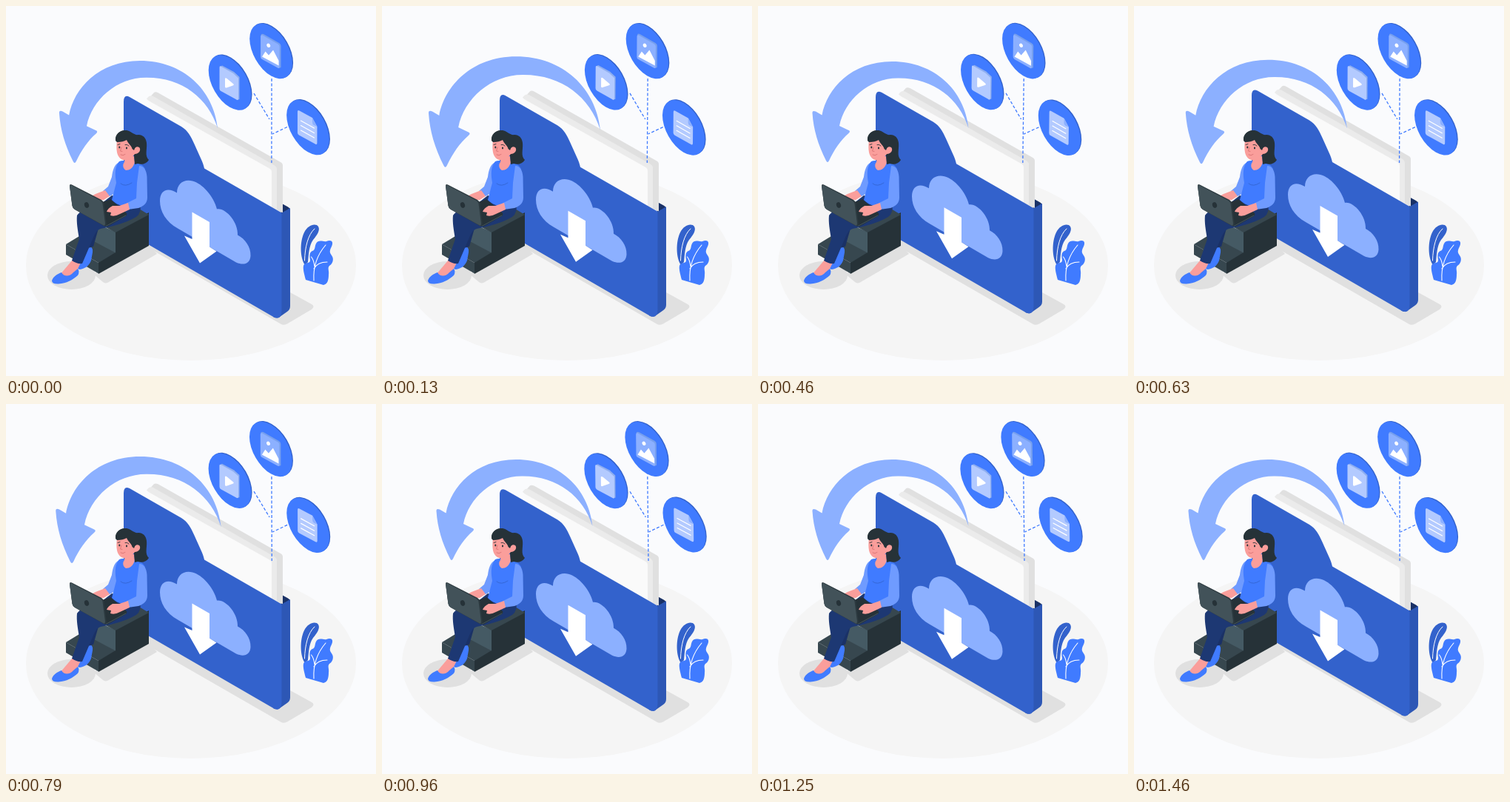
These frames come from a looping animation (500x500 px, 1500 ms). An HTML page with a canvas:

```html
<!DOCTYPE html>
<html lang="en">
<head>
<meta charset="utf-8">
<title>Cloud download</title>
<style>
  html, body { margin: 0; width: 100%; height: 100%; overflow: hidden; background: #fafbfd; }
  canvas { display: block; width: 500px; height: 500px; }
</style>
</head>
<body>
<canvas id="stage"></canvas>
<script>
const LOOP = 1500;
const PHASE = 21;
const BLUE = '#407bff', DEEP = '#3362cc', SIDE = '#2d57b5', NAVY = '#1a3166', DENIM = '#1d3873';
const PALE = '#8cb0ff', PAGE = '#b3caff', SLEEVE = '#6f9bff', SKIN = '#fa9e9b';
const INK = '#263238', SLATE = '#37474f', STEEL = '#425259';
const WHITE = '#fff', SHADE = '#e0e0e0';

const canvas = document.getElementById('stage');
const ctx = canvas.getContext('2d');
const ratio = window.devicePixelRatio || 1;
canvas.width = canvas.height = 500 * ratio;

const cache = new Map();
function path(d) {
  if (!cache.has(d)) cache.set(d, new Path2D(d));
  return cache.get(d);
}

function fill(color, d) {
  ctx.fillStyle = color;
  ctx.fill(path(d));
}

function line(color, width, d, dash = []) {
  ctx.strokeStyle = color;
  ctx.lineWidth = width;
  ctx.lineCap = dash.length ? 'butt' : 'round';
  ctx.lineJoin = 'round';
  ctx.setLineDash(dash);
  ctx.stroke(path(d));
}

function oval(color, x, y, rx, ry, turn = 0) {
  ctx.fillStyle = color;
  ctx.beginPath();
  ctx.ellipse(x, y, rx, ry, turn, 0, Math.PI * 2);
  ctx.fill();
}

function group(setup, draw) {
  ctx.save();
  setup();
  draw();
  ctx.restore();
}

// Linear interpolation through [position, value] stops.
function track(p, stops) {
  const i = stops.findIndex(s => s[0] > p);
  const [p0, v0] = stops[i - 1], [p1, v1] = stops[i];
  return v0 + (v1 - v0) * (p - p0) / (p1 - p0);
}

const floatY = p => track(p, [[0, 0], [.5, -10], [1, 0]]);
const sway = p => track(p, [[0, 0], [.25, 1], [.75, -1], [1, 0]]) * Math.PI / 180;
const beat = p => track(p, [[0, 1], [.1, 1.1], [.3, 1], [.4, 1], [.5, 1.1], [.6, 1], [1, 1]]);

function drawFloor() {
  oval('#f5f5f5', 250, 350.2, 223, 128.8);
  fill(SHADE, 'M185 322.5 L371 429.5 Q375 432 380 429.5 L413 410 Q418 406 413 403 L384 387 L300 330 L185 300Z');
  fill(SHADE, 'M118 362 L131 373 Q134 375.5 138 373.5 L204 335 L192 322Z');
  oval(SHADE, 88.5, 364, 32.5, 19);
}

function drawPlant() {
  fill(DEEP, 'M404 350 C397 340 397 318 403 306 C408 296 418 293 422 298 C425 303 420 310 415 316 C409 324 409 338 408 346Z');
  line(WHITE, 1, 'M417 301 C408 309 404 326 403.5 344');
  fill(BLUE, 'M405 370 C403 362 400 352 403 349 C408 346 411 348 411 343 C410 337 410 333 414 331 C418 330 417 325 419 321 C422 315 429 319 433 318 C440 315 443 319 440 325 C437 331 437 333 440 337 C444 342 441 349 437 351 C434 354 437 358 436 363 C436 369 435 376 429 377Z');
  line(WHITE, 1.1, 'M416 371 C415 354 419 338 432 323 M417 352 Q416 343 412.5 339 M416 355 Q421 346 434 346');
}

function drawFolder() {
  fill(NAVY, 'M371 265.5 L381 271 Q384 272.5 384 276 L372 283Z');
  fill(SHADE, 'M196 121 L200 116.5 Q202 115 206 117 L371 210.5 Q374 212 374 215 V279 L340 262Z');
  fill('#ebebeb', 'M190 125 Q194 119 199 121.5 L363 215 Q366 217 366 220 V275 L330 258Z');
  fill('#fafafa', 'M190 126 L356 219 Q359 220.5 359 224 V272 L250 230Z');
  fill(SIDE, 'M370 280.5 L384 272.5 V405 Q384 410 380 412.5 L370 419.5 Q366 422.5 361 419.5Z');
  fill(DEEP, 'M159 129 Q159 118.5 167 122.5 L237 162.5 C246 168 250 176 254 185 L263 205 C266 211 267 215 268 219 L372.5 279 V411 Q372.5 424.5 362 420 L159 302.5Z');
  fill(PALE, 'M208 263 C208 249 218 244 231 252 C231 240 240 233 252 236 C265 239 281 257 285 274 C297 272 314 292 313 309 C323 314 331 325 330.5 337 C330 347 322 351 311 346 L232 300 C216 291 208 277 208 263Z');
  fill(WHITE, 'M251.5 278 L275 291.5 V325 L284.5 331 L262 347 L241 310 L251.5 314.5Z');
}

function disc(x, y) {
  const slanted = (color, cx, cy) => group(
    () => ctx.transform(.866, .5, 0, 1, cx, cy),
    () => oval(color, 0, 0, 33.3, 33.3));
  slanted(DEEP, x + 1.2, y - .8);
  slanted(BLUE, x, y);
}

function drawFiles() {
  line(BLUE, 1.3, 'M359 98 V212', [4, 2.5]);
  line(BLUE, 1.3, 'M335 118 L356 153 M380 163.5 L360 173', [4, 2.5]);

  disc(358, 61);
  fill('#769fee', 'M344.5 39 Q345 37 348 38 L369 50 Q371.5 51.5 371.5 54 V83 L369 84Z');
  fill(PALE, 'M344 41 Q344 38.5 346.5 39.5 L367.5 51.5 Q369.5 52.5 369.5 55 V82 Q369.5 85 367 83.5 L346 72 Q344 71 344 68.5Z');
  oval(WHITE, 354.7, 53.3, 2.3, 2.8, -.5);
  fill(WHITE, 'M346 68.5 L350.5 61.5 L355 66.5 L361 59.5 L368.5 74 V80.5Z');

  disc(302.5, 103.6);
  fill('#8eaef0', 'M289 82 L292 80.5 L308 89 L315.5 96 V126 L312 127Z');
  fill(PAGE, 'M288.5 83 Q288.5 80.5 291 82 L307 91 L314 97.5 V125 Q314 128 311.5 126.5 L290.5 115 Q288.5 114 288.5 111.5Z');
  fill(WHITE, 'M296 98 Q296.5 96.5 298.5 98 L307.5 105.5 Q308.5 107 306.5 107.5 L298 110.5 Q296 111 296 109Z');

  disc(408, 164);
  fill(PAGE, 'M394 143 Q394 140 396.5 141.5 L414 151 L420.5 163 V185 Q420.5 188 418 186.5 L396 174.5 Q394 173.5 394 171Z');
  fill(PALE, 'M414 151 L420.5 163 L416 161 Q414 160 414 157Z');
  line(WHITE, 1.2, 'M398.5 155 L416.5 165 M398.5 161.5 L416.5 171.5 M398.5 168 L416.5 178');
}

function drawArrow() {
  fill(PALE, 'M73.5 145 Q73 140.5 78 142.5 L86.5 147.5 C93 112 126 75 181 75 C239 75 279 114 284.5 165 C272 125 237 97 189 97.5 C150 97.5 117 127 110 162 L121.5 167.5 Q126 169 122.5 172 C112 181 103 194 96 209 Q94 213 92 209 C81 187 75 167 73.5 145Z');
}

function drawSeat() {
  fill(INK, 'M148 304 L193 279 V324 L125 362 V346Z');
  fill(SLATE, 'M81 322 L104 308 L148 333 L125 347Z');
  fill(SLATE, 'M81 322 L125 347 V361.5 L81 336Z');
  fill('#455a64', 'M100 285 L148 305 V333.5 L100 308Z');
  fill(SLATE, 'M110 286 L160 262 L193 282 L148 306Z');
}

function drawLegs() {
  fill(SKIN, 'M104 326 L114 328 L110 338 L102 346 L98 342Z');
  fill(BLUE, 'M97 352 C102 345 106 343 108 333 L113 324 Q118 327 117 333 L115 344 C112 352 106 355 100 356 Q96 356 97 352Z');
  fill(NAVY, 'M128 290 L118 325 Q110 329 100 324 L104 287Z');
  fill(SKIN, 'M90 343 L101 347 L96 357 L84 368 L73 363Z');
  fill(BLUE, 'M62 371 C64 365 70 362 75 360 C78 366 86 366 91 360 L97 355 Q100 359 97 364 C90 370 82 375 71 375.5 Q62 376 62 371Z');
  fill(DENIM, 'M143 256 L181 266 Q184 279 176 285 C160 294 143 298 128 301 C121 303 119 311 115 320 L103 348 Q96 349 89 344 L99 315 C97 303 95 292 96 283 Q102 274 125 270Z');
}

function drawBody() {
  fill(SLEEVE, 'M153 211 C146 214 144 223 143 231 L138 244 L131 250 L137 258 C146 256 149 250 151 243Z');
  fill(SKIN, 'M134 249 L121 254 L110 260 L120 262 L132 262 L140 257Z');
  fill(BLUE, 'M153 210 Q158 208 162 210 L176 211 Q184 213 188 220 L184 245 L180 267 C169 275 151 271 143 262 L149 239 C147 226 147 217 153 210Z');
  fill(SKIN, 'M161 204 L173 203 L174 211 C172 219 167 222 162 222 C158 220 157 214 160 211Z');
  line(DEEP, .8, 'M155 240 Q161 245 170 239');
}

function drawHead() {
  fill(INK, 'M148 181 C147 173 155 167 163 168 C168 169 171 172 174 175 C182 172 189 176 190 185 C191 194 187 202 193 208 C190 213 184 215 178 213 L174 214 L172 190Z');
  fill(SKIN, 'M150 181 C149 190 149 198 152 203 C155 209 163 210 169 206 L174 200 C180 200 183 194 180 191 C177 189 174 191 173 194 L170 181Z');
  fill(INK, 'M148 182 C148 171 157 165 167 170 L180 176 V190 Q175 188 173 195 L170.5 193 C170 189 165 186 163 181 C160 183 155 184 150 184Z');
  oval(INK, 153.3, 191, 1, 1.4);
  oval(INK, 163, 192, 1, 1.4);
  line(INK, .9, 'M151 187.5 L154 186.5 M161 187.5 Q164 186.5 166 189');
  line('#d66f70', .8, 'M156 191 L154.5 196 L157 196.5 M155 201 Q158 203 161 200.5');
}

function drawLaptop() {
  fill(INK, 'M128 266 L141 261 L163 280 Q164 283 161 284.5 L137 298 L132 296Z');
  line('#4b5d66', .8, 'M135 297.5 L162 283');
  fill('#2c393f', 'M86 243 Q86 240 89 241.5 L129 262 Q132 264 132.5 267 L136 295 Q136 299 132 297 L93 275 Q90 273 89.5 270Z');
  fill(STEEL, 'M86 244 Q86 241 89 242.5 L127.5 263 Q130 264.5 130.5 267 L134 294 Q134 298 131 296 L93 275 Q90 273 89.5 270Z');
  oval(INK, 109, 269, 3, 4, -.3);
}

function drawNearArm() {
  fill(SLEEVE, 'M180 216 C187 216 190 223 190.5 231 L191 259 C191 267 185 271 179 273 L165 275 L162 267 L176 260 L177 239Z');
  fill(SKIN, 'M165 266 L153 270 L144 270 Q138 273 136 278 L142 279 L141 283 Q147 285 154 281 L167 275Z');
}

function drawWoman() {
  drawSeat();
  drawLegs();
  drawBody();
  drawHead();
  drawLaptop();
  drawNearArm();
}

function render(now) {
  const p = (now + PHASE) % LOOP / LOOP;
  ctx.setTransform(ratio, 0, 0, ratio, 0, 0);
  ctx.fillStyle = '#fafbfd';
  ctx.fillRect(0, 0, 500, 500);

  drawFloor();
  drawPlant();
  group(() => ctx.translate(0, floatY(p) + .7), drawFolder);
  group(() => {
    ctx.translate(355.7, 117);
    ctx.rotate(sway(p));
    ctx.translate(-355.7, -117);
  }, drawFiles);
  group(() => {
    ctx.translate(179, 142.7);
    ctx.scale(beat(p), beat(p));
    ctx.translate(-179, -142.7);
  }, drawArrow);
  drawWoman();
}

const start = performance.now();
function tick() {
  render(performance.now() - start);
  requestAnimationFrame(tick);
}
tick();
</script>
</body>
</html>
```
